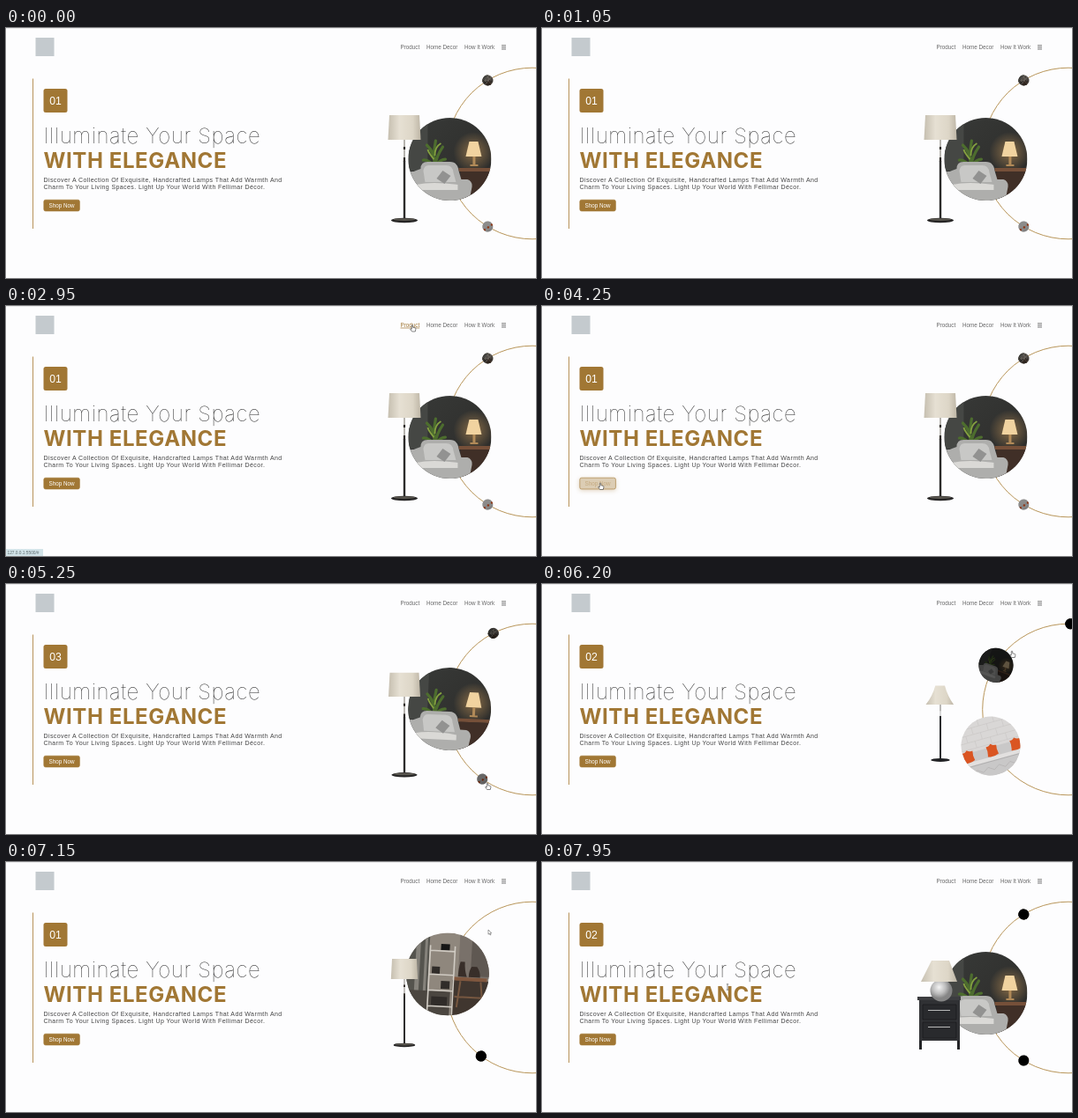
An HTML page that plays this animation: 600 px wide and 284 px high, repeating every 8000 ms.

```html
<!DOCTYPE html>
<html lang="en">
<head>
<meta charset="utf-8">
<title>Lamp shop</title>
<style>
html, body { margin: 0; width: 100%; height: 100%; overflow: hidden; background: #fdfdfe; }
svg { display: block; width: 100vw; height: 100vh; }
text { font-family: "Liberation Sans", Arial, sans-serif; white-space: pre; }
.nav { font-size: 6.3px; fill: #686868; }
.copy { font-size: 7px; letter-spacing: .407px; fill: #444; }
.head { font-family: Inter, sans-serif; font-size: 24px; letter-spacing: .6px; }
</style>
</head>
<body>
<svg viewBox="0 0 600 284" xmlns="http://www.w3.org/2000/svg">
  <defs>
    <clipPath id="disc"><circle r="47"/></clipPath>
    <linearGradient id="shade">
      <stop offset="0" stop-color="#c6bfb0"/><stop offset=".35" stop-color="#e6e0d3"/>
      <stop offset=".75" stop-color="#ddd6c7"/><stop offset="1" stop-color="#beb6a6"/>
    </linearGradient>
    <linearGradient id="wall" x2="1" y2="1">
      <stop offset="0" stop-color="#383a38"/><stop offset="1" stop-color="#2b2a28"/>
    </linearGradient>
    <radialGradient id="glow">
      <stop offset="0" stop-color="#e0a860" stop-opacity=".5"/><stop offset="1" stop-color="#e0a860" stop-opacity="0"/>
    </radialGradient>
    <radialGradient id="ball" cx=".4" cy=".35">
      <stop offset="0" stop-color="#f4f4f4"/><stop offset=".6" stop-color="#bcbcbc"/><stop offset="1" stop-color="#858585"/>
    </radialGradient>
    <filter id="soft" x="-30%" y="-80%" width="160%" height="260%"><feGaussianBlur stdDeviation="2.5"/></filter>

    <g id="photo0">
      <rect x="-47" y="-47" width="94" height="94" fill="#8f877d"/>
      <path d="M-47-47h25v94h-25z" fill="#55544e"/>
      <path d="M-37-47h5v94h-5zM-27-47h3v94h-3z" fill="#85827b"/>
      <path d="M12-47h35v50h-35z" fill="#79716a"/>
      <path d="M26-47h21v48h-21z" fill="#5f5852"/>
      <path d="M6 6h41v41h-41z" fill="#40362f"/>
      <path d="M-47 20h51v27h-51z" fill="#4b4640"/>
      <path d="M-9-34h10v7h-10z" fill="#161616"/>
      <path d="M-18-8h9v8h-9zM-7 8h10v9h-10zM-17 26h18v10h-18z" fill="#302c29"/>
      <path d="M12 2q0-10 2-17h5q0 10 3 17zM24 2q0-8 3-12h6q4 5 4 12z" fill="#382e29"/>
      <path d="M7 4.500h38" stroke="#80573e" stroke-width="4"/>
      <path d="M15 7l-3 30M38 7l3 24M9 25h32" stroke="#765740" stroke-width="2"/>
      <path d="M-21-32v78M7-32v78M-21-26h28M-21 1h28M-21 19h28M-21 37h28" stroke="#d0cbc3" stroke-width="1.600"/>
    </g>
    <g id="photo1">
      <rect x="-47" y="-47" width="94" height="94" fill="url(#wall)"/>
      <path d="M-47-47h22v60h-22z" fill="#454744"/>
      <circle cx="27" cy="-8" r="23" fill="url(#glow)"/>
      <path d="M-17 8q0-16-9-24M-17 8q-2-14 1-29M-17 8q2-12 9-22M-17 8q6-8 12-8M-17 8q-8-8-13-7" fill="none" stroke="#4d6d2e" stroke-width="3.200" stroke-linecap="round"/>
      <path d="M-17-4q0-10 7-14M-18 0q-6-7-7-11" fill="none" stroke="#84a140" stroke-width="1.800"/>
      <path d="M22-20h10l4 17h-18z" fill="#f1d3a0"/>
      <path d="M26-3h3v10h-3zM23 6h9v2h-9z" fill="#b18a58"/>
      <path d="M10 10h37v4h-37z" fill="#765039"/>
      <path d="M12 14h35v33h-35z" fill="#402f27"/>
      <path d="M-33 11q0-8 8-8h25q9 0 10 10l3 10h7q6 2 5 9l-3 15h-72v-26q2-8 9-7z" fill="#aeaeac"/>
      <path d="M-30 13q1-6 6-6h20q7 0 8 8l3 11h-35z" fill="#c8c8c6"/>
      <path d="M-38 29q18-4 47 0v6h-47z" fill="#dad9d6"/>
      <path d="M-8 13l9 6-7 9-9-6z" fill="#929291"/>
    </g>
    <g id="photo2">
      <rect x="-47" y="-47" width="94" height="94" fill="#d9d7d6"/>
      <path d="M-47-36h94M-47-25h94M-47-14h94M-47-3h94M-34-47v11M-10-47v11M15-47v11M-22-36v11M3-36v11M28-36v11M-34-25v11M-10-25v11M15-25v11M-22-14v11M3-14v11M28-14v11" stroke="#cbc8c6" stroke-width=".9"/>
      <path d="M-47 2h94v45h-94z" fill="#c9c8c8"/>
      <path d="M-47 17h94v6h-94z" fill="#e2e0df"/>
      <path d="M-47 24h94" stroke="#a9a8a8"/>
      <path d="M-40 38l9-6 9 6 9-6 9 6 9-6 9 6 9-6 9 6 9-6" fill="none" stroke="#b5b3b3"/>
      <g fill="#da5522">
        <path id="pad" d="M-8 0q4 1 8-3 4 4 9 3-2 7 0 15-9 4-18 1 3-8 1-16z"/>
        <use href="#pad" x="-39"/><use href="#pad" x="39"/>
      </g>
    </g>

    <g id="lamp0">
      <path d="M0-34V-8" stroke="#a4a09a" stroke-width="1.600"/>
      <path d="M0-25v3M0-13v5" stroke="#2b2723" stroke-width="2.200"/>
      <path d="M0-9V57" stroke="#2c2b2b" stroke-width="2.400"/>
      <ellipse cy="58.500" rx="15" ry="2.800" fill="#262525"/>
      <ellipse cy="57.600" rx="12.500" ry="1.400" fill="#59564f"/>
      <path d="M-17-61h34l1.500 28h-37z" fill="url(#shade)"/>
    </g>
    <g id="lamp1">
      <path d="M-24-5h46v48h-46z" fill="#303134"/>
      <path d="M-24 43h3v10h-3zM19 43h3v10h-3z" fill="#232427"/>
      <path d="M-26-7h49v4h-49z" fill="#3c3d40"/>
      <path d="M-20 2h38v17h-38zM-20 22h38v18h-38z" fill="#292a2d" stroke="#17181a" stroke-width=".7"/>
      <path d="M-14 8.500h25M-14 27.500h25" stroke="#b9b9b9" stroke-width="1.200"/>
      <path d="M-5-10h12v3.500h-12z" fill="#9c9c9c"/>
      <circle cx="1" cy="-14" r="12.500" fill="url(#ball)"/>
      <path d="M-1-28h4v4h-4z" fill="#77736c"/>
      <path d="M-10-48h20l9 24h-41z" fill="url(#shade)"/>
    </g>
    <g id="lamp2">
      <path d="M0-33v20" stroke="#8e8b88" stroke-width="1.700"/>
      <path d="M0-22v8" stroke="#dedede" stroke-width="2.500"/>
      <path d="M0-14V55" stroke="#2b2c2f" stroke-width="2.800"/>
      <ellipse cy="55.500" rx="15" ry="2.800" fill="#202124"/>
      <path d="M-8-62h15q4 16 14 30h-44q11-14 15-30z" fill="url(#shade)"/>
    </g>
  </defs>

  <rect width="600" height="284" fill="#fdfdfe"/>
  <path d="M0 .4h600" stroke="#e2e3e5" stroke-width=".8"/>
  <rect x="33.500" y="11" width="21" height="21" fill="#c4cace"/>
  <g id="nav"></g>
  <path d="M561 19.800h5M561 21.900h5M561 24h5" stroke="#555" stroke-width=".8"/>

  <path d="M30.500 57.500V228" stroke="#b8935a"/>
  <rect x="42.500" y="69" width="27" height="27" rx="2.500" fill="#a17734"/>
  <text id="num" x="56" y="86.700" font-size="12.200" fill="#fff" text-anchor="middle"></text>
  <text class="head" x="42.500" y="131.300" font-weight="100" fill="#2c2c2c">Illuminate Your Space</text>
  <text class="head" x="42.500" y="159.200" font-weight="700" fill="#a17734">WITH ELEGANCE</text>
  <text class="copy" x="42.500" y="175.200">Discover A Collection Of Exquisite, Handcrafted Lamps That Add Warmth And</text>
  <text class="copy" x="42.500" y="183.200">Charm To Your Living Spaces. Light Up Your World With Fellimar Décor.</text>

  <rect id="halo" x="42" y="196" width="42" height="14" rx="3" fill="#a17734" filter="url(#soft)"/>
  <rect id="btn" x="42.800" y="195.200" width="40.600" height="12.800" rx="2" stroke="#a17734" stroke-width=".6"/>
  <text id="btnText" x="63" y="203.700" font-size="6.300" text-anchor="middle">Shop Now</text>

  <circle cx="596" cy="142.500" r="97.300" fill="none" stroke="#b9965a"/>
  <g id="photos"></g>
  <use id="lamp"/>

  <g id="status">
    <rect y="276" width="42" height="8" fill="#d3e4e9"/>
    <text x="1.500" y="282" font-size="4.800" fill="#5b686c">127.0.0.1:5500/#</text>
  </g>
  <g id="cursor">
    <path id="arrow" d="M0 0v5.200l1.200-1.100.9 1.900.9-.4-.9-1.800h1.600z" fill="#fff" stroke="#444" stroke-width=".5"/>
    <path id="hand" d="M-.7.500q.7-1 1.400 0v2.300l2.600.6q.8.300.6 1.200l-.6 2.900h-3.700l-2-2.700q0-1 1.700 0z" fill="#fff" stroke="#333" stroke-width=".6"/>
    <path id="beam" d="M-1.200-3.200h2.400M0-3.200v6.400M-1.200 3.200h2.400" stroke="#444" stroke-width=".6"/>
  </g>
</svg>
<script>
const LOOP = 8000, RADIUS = 97.3, STEP = 58.6, TURN = 600, LAMP_OUT = 300, LAMP_IN = 160;
const $ = id => document.getElementById(id);
const clamp = x => Math.min(1, Math.max(0, x));
const mix = (a, b, p) => a + (b - a) * p;
const blend = (a, b, p) => `rgb(${a.map((v, i) => Math.round(mix(v, b[i], p)))})`;
const smooth = p => p * p * (3 - 2 * p);
const GOLD = [161, 119, 52], WHITE = [255, 255, 255];

// CSS "ease": cubic-bezier(.25, .1, .25, 1)
function ease(x) {
  if (x <= 0 || x >= 1) return clamp(x);
  let lo = 0, hi = 1;
  for (let i = 0; i < 24; i++) {
    const s = (lo + hi) / 2, q = 1 - s;
    if (.75 * s * q * q + .75 * s * s * q + s ** 3 < x) lo = s; else hi = s;
  }
  const q = 1 - lo;
  return .3 * lo * q * q + 3 * lo * lo * q + lo ** 3;
}

// Slide changes; the page opens on the middle photo with the first label and lamp.
const slides = [
  { at: -2000, pos: 1, item: 0 },
  { at: 5200, pos: 2, item: 2 },
  { at: 6042, pos: 1, item: 1 },
  { at: 6768, pos: 0, item: 0 },
  { at: 7350, pos: 1, item: 1 }
];

// Pointer stops: time, x, y
const path = [
  [2150, 482, -8], [2640, 460, 21.5], [3430, 460, 21.5], [4150, 66, 201],
  [4480, 66, 201], [5100, 545, 226], [5330, 545, 226], [5900, 545, 60], [6050, 544, 61],
  [6200, 532, 76], [6500, 540, 68], [6680, 545, 60], [6850, 545, 62],
  [7150, 546, 77], [7330, 545, 224], [7420, 545, 224], [7950, 210, 142]
];

const links = [["Product", 446.5, 21.7], ["Home Decor", 476, 35.3], ["How It Work", 519, 34]].map(([label, x, w]) => {
  $("nav").insertAdjacentHTML("beforeend",
    `<g><text class="nav" x="${x}" y="23.8">${label}</text><path d="M${x} 25h${w}" stroke="#a17734" stroke-width=".7"/></g>`);
  const [text, line] = $("nav").lastChild.children;
  return { x, w, text, line };
});

// How far each photo strays from the ring when fully grown
const drift = [{ lean: 3.6, inset: 0 }, { lean: -4, inset: 3.5 }, { lean: 1, inset: 0 }];
const photos = drift.map((d, i) => {
  $("photos").insertAdjacentHTML("beforeend",
    `<g><g clip-path="url(#disc)"><use href="#photo${i}"/></g><circle r="47.3"/></g>`);
  const node = $("photos").lastChild;
  return { ...d, node, veil: node.lastChild };
});

const show = (node, on) => node.setAttribute("visibility", on ? "visible" : "hidden");

function pointer(t) {
  if (t < path[0][0]) return null;
  const i = path.findIndex(p => p[0] > t);
  if (i < 0) return path[path.length - 1].slice(1);
  const a = path[i - 1], b = path[i], p = smooth((t - a[0]) / (b[0] - a[0]));
  return [mix(a[1], b[1], p), mix(a[2], b[2], p)];
}

function drawCarousel(t) {
  const n = slides.filter(s => s.at <= t).length - 1;
  const cur = slides[n], prev = slides[Math.max(0, n - 1)];
  const dt = t - cur.at, p = ease(dt / TURN);
  const grow = p ** 3 / (p ** 3 + (1 - p) ** 3);
  const off = mix(prev.pos - 1, cur.pos - 1, p) * STEP;
  const dim = mix(.35, 1, clamp((t - slides[1].at) / 200));

  const spots = photos.map(({ node, veil, lean, inset }, i) => {
    const k = i === cur.pos ? (n ? grow : 1) : i === prev.pos ? 1 - grow : 0;
    const turn = (1 - i) * STEP + off;
    const a = (turn + k * lean) * Math.PI / 180;
    const dist = RADIUS - inset * k, r = mix(6, 47, k);
    const x = 596 - dist * Math.cos(a), y = 142.5 - dist * Math.sin(a);
    node.setAttribute("transform", `translate(${x} ${y}) rotate(${turn * .6}) scale(${r / 47})`);
    veil.setAttribute("opacity", dim * clamp(1.2 - 1.8 * k));
    return { x, y, r };
  });

  const leaving = dt < LAMP_OUT;
  const size = leaving ? 1 - (dt / LAMP_OUT) ** 2 : ease((dt - LAMP_OUT) / LAMP_IN);
  $("lamp").setAttribute("href", "#lamp" + (leaving ? prev : cur).item);
  $("lamp").setAttribute("transform", `translate(451 160) scale(${size})`);
  $("num").textContent = "0" + (cur.item + 1);
  return spots;
}

function drawPointer(t, spots) {
  const at = pointer(t), [x, y] = at || [-50, -50];
  const inside = (l, top, r, b) => x > l && x < r && y > top && y < b;
  let onLink = false;
  for (const { x: left, w, text, line } of links) {
    const hot = inside(left - 1, 16, left + w + 1, 27);
    text.style.fill = hot ? "#a17734" : "";
    show(line, hot);
    onLink = onLink || hot;
  }
  show($("status"), onLink);
  const onDot = spots.some(s => Math.hypot(x - s.x, y - s.y) < s.r + 8);
  const hand = onLink || onDot || inside(42, 195, 84, 208);
  const beam = !hand && inside(42, 110, 292, 186);
  show($("hand"), at && hand);
  show($("beam"), at && beam);
  show($("arrow"), at && !hand && !beam);
  $("cursor").setAttribute("transform", `translate(${x} ${y})`);
}

function drawButton(t) {
  const h = clamp((t - 4125) / 200) * (1 - clamp((t - 4560) / 200));
  $("btn").setAttribute("fill", blend(GOLD, WHITE, h));
  $("btnText").setAttribute("fill", blend(WHITE, GOLD, h));
  $("halo").setAttribute("opacity", h * .45);
}

function draw(t) {
  drawPointer(t, drawCarousel(t));
  drawButton(t);
}

const start = performance.now();
function frame() {
  draw((performance.now() - start) % LOOP);
  requestAnimationFrame(frame);
}
frame();
</script>
</body>
</html>
```
